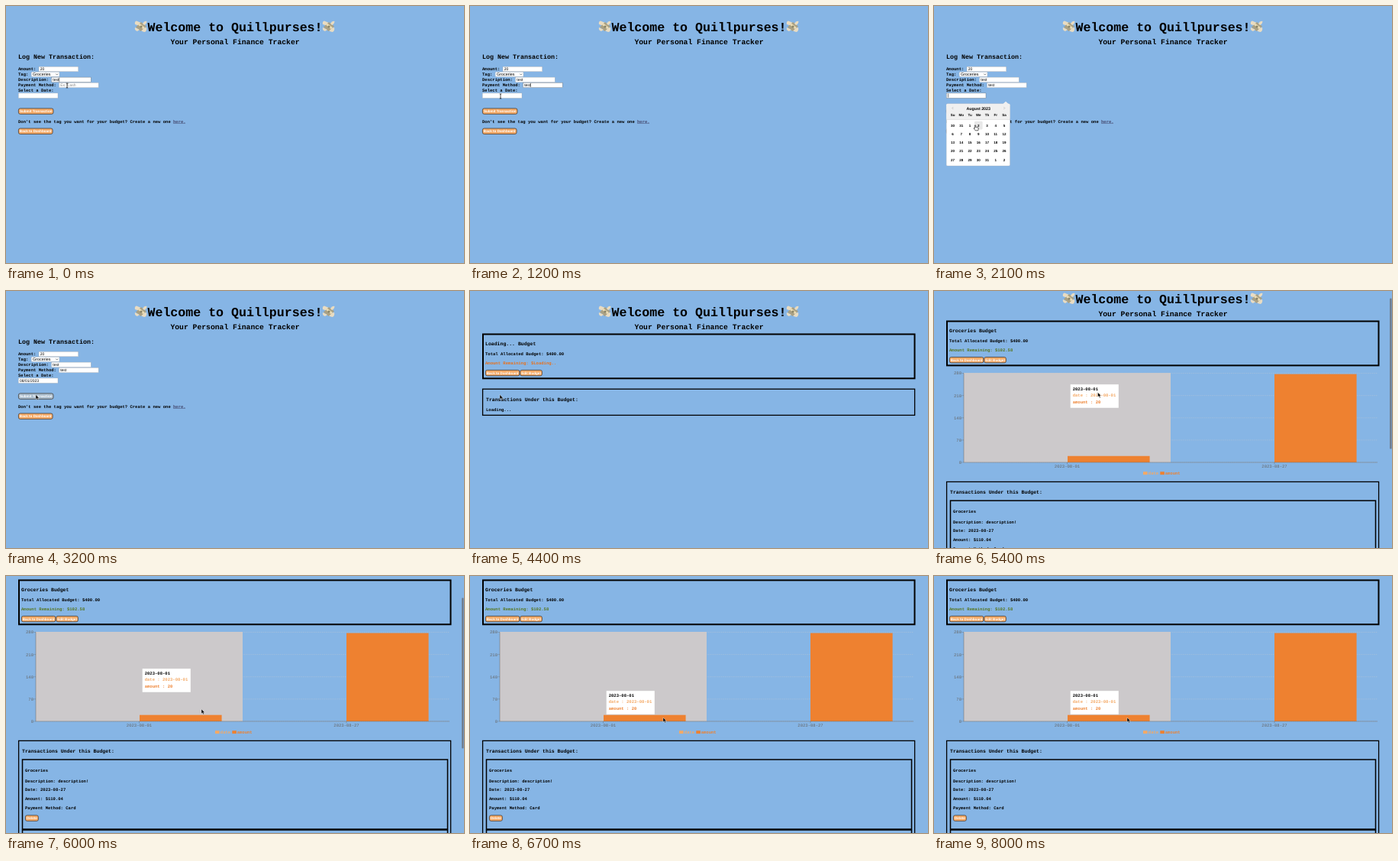
Animation of 600 by 336 pixels, one loop 8100 ms. Source, as an HTML page:

```html
<!DOCTYPE html>
<html lang="en">
<head>
<meta charset="utf-8">
<title>Finance tracker</title>
<style>
  html, body { margin: 0; height: 100%; overflow: hidden; background: #86b5e5; }
  svg { display: block; width: 100vw; height: 100vh; }
  text { font: bold 5.55px "Liberation Mono", monospace; text-rendering: geometricPrecision; }
  .sans { font-family: "Liberation Sans", sans-serif; }
  .plain { font-weight: normal; }
</style>
</head>
<body>
<svg id="stage" viewBox="0 0 600 336"></svg>
<script>
const LOOP = 8100;
const ORANGE = '#ee8130', SAND = '#f4a965', FIELD_EDGE = '#9ba3ac';
const CHART = { left: 39, right: 581, top: 124.5, bottom: 241, max: 280 };
const chartY = v => CHART.bottom - v / CHART.max * (CHART.bottom - CHART.top);

// Markup helpers
const text = (x, y, s, { size = 5.55, fill = '#000', anchor = 'start', cls = '', id = '' } = {}) =>
  `<text id="${id}" x="${x}" y="${y}" class="${cls}" fill="${fill}" text-anchor="${anchor}" style="font-size:${size}px">${s}</text>`;
const rect = (x, y, w, h, fill, more = '') =>
  `<rect x="${x}" y="${y}" width="${w}" height="${h}" fill="${fill}" ${more}/>`;
const frame = (x, y, w, h, width) => rect(x, y, w, h, 'none', `stroke="#000" stroke-width="${width}"`);
const group = (id, ...parts) => `<g id="${id}">${parts.join('')}</g>`;
const input = (x, y, id, value = '') =>
  rect(x, y, 51.8, 6.6, '#fff', `id="${id}Box" stroke="${FIELD_EDGE}" stroke-width=".4"`) +
  text(x + 1.8, y + 5, value, { cls: 'sans plain', id, size: 5 });
const button = (x, y, w, label, id = '') =>
  rect(x + .4, y + .4, w - .8, 7.4, SAND, `id="${id}" rx="2.2" stroke="#3b3028" stroke-width=".7"`) +
  text(x + w / 2, y + 5.8, label, { size: 4.6, fill: '#fff', anchor: 'middle', cls: 'sans' });

const money = x => `<g transform="translate(${x} 19)">
  <path d="M1 5Q0 1 3 .5L9 3 7 7ZM10 11L16 9Q17 13 14 15Q11 15 9 13Z" fill="#e9dcc2"/>
  <path d="M2 8.5L9 2 16 7.5 8.5 14Z" fill="#aaa184"/><path d="M5 5.6L7 3.8 14 9.2 11.8 11.2Z" fill="#ecdcb4"/>
  <circle cx="9" cy="8" r="1.6" fill="#8a8568"/>
  <path d="M11 4Q13 0 16.5 1Q16 5 13 6ZM1 9Q0 13 4 14L7 12Z" fill="#e9dcc2"/></g>`;

const header = group('header',
  money(168), money(414),
  text(300, 33, 'Welcome to Quillpurses!', { size: 16.6, anchor: 'middle' }),
  text(300, 49.5, 'Your Personal Finance Tracker', { size: 9.72, anchor: 'middle' }));

function calendar() {
  const sans = { cls: 'sans', anchor: 'middle', size: 4.5 };
  const col = i => 24.6 + 11.23 * i;
  const names = ['Su', 'Mo', 'Tu', 'We', 'Th', 'Fr', 'Sa'].map((d, i) => text(col(i), 144, d, sans));
  const days = Array.from({ length: 35 }, (_, i) =>
    text(col(i % 7), 157.8 + 11.2 * Math.floor(i / 7), i < 2 ? 30 + i : (i - 2) % 31 + 1, sans));
  return group('calendar',
    rect(16.2, 127.7, 83.3, 81.3, '#fff', 'rx="1.6" stroke="#aeb3ba" stroke-width=".4"'),
    '<path d="M90.5 128L94 124.8 97.5 128Z" fill="#f0f0f0"/>',
    rect(16.4, 127.9, 82.9, 20.3, '#f0f0f0', 'rx="1.4"'),
    rect(16.4, 148, 82.9, .4, '#c4c4c4'),
    '<path d="M25.3 132L23.8 133.5 25.3 135M91.3 132L92.8 133.5 91.3 135" fill="none" stroke="#bbb" stroke-width=".8"/>',
    text(58.2, 136, 'August 2023', { ...sans, size: 5.3 }),
    rect(0, 150.8, 10.6, 10.6, '#e8e8e8', 'id="hoverDay" rx="1.4"'),
    ...names, ...days);
}

const form = group('form',
  text(16, 69, 'Log New Transaction:', { size: 8.33 }),
  text(16, 84.3, 'Amount:'), input(43, 79.2, 'amount', '20'),
  text(16, 91.2, 'Tag:'),
  rect(33.2, 86.2, 36.8, 6.2, '#fff', `rx="1" stroke="${FIELD_EDGE}" stroke-width=".4"`),
  text(35, 91.1, 'Groceries', { cls: 'sans plain', size: 5.4 }),
  '<path d="M65.3 88.6L66.7 90.1 68.1 88.6" fill="none" stroke="#333" stroke-width=".6"/>',
  text(16, 98, 'Description:'), input(59.5, 93.1, 'description', 'test'),
  text(16, 105.1, 'Payment Method:'), input(69.4, 100.2, 'payment'),
  text(16, 112, 'Select a Date:'), input(16.2, 113.9, 'date'),
  rect(0, 0, .5, 5, '#000', 'id="caret"'),
  button(16, 133.5, 46.4, 'Submit Transaction', 'submit'),
  text(16, 152.6, "Don't see the tag you want for your budget? Create a new one"),
  text(219, 152.6, 'here.', { fill: '#454a70' }),
  rect(219, 153.3, 16, .5, '#454a70'),
  button(16, 159.6, 45.5, 'Back to Dashboard'),
  calendar());

const summary = group('summary',
  frame(17, 56.5, 565.5, 57.8, 2),
  text(20, 71, '', { size: 6.5, id: 'heading' }),
  text(20, 84, 'Total Allocated Budget: $400.00'),
  text(20, 95.8, '', { id: 'remaining' }),
  button(20, 103, 45.3, 'Back to Dashboard'),
  button(65.3, 103, 29.5, 'Edit Budget'));

const waiting = group('waiting',
  frame(16.6, 128.2, 566, 34.2, 1.3),
  text(21, 144, 'Transactions Under this Budget:', { size: 6.5 }),
  text(21, 157, 'Loading...'));

const { left, right, top: plotTop, bottom } = CHART;
const ticks = [0, 70, 140, 210, 280].map(v =>
  `<path d="M${left} ${chartY(v)}H${right}" stroke="#ccc" stroke-width=".4" stroke-dasharray="1.25 1.25"/>` +
  `<path d="M${left - 2.5} ${chartY(v)}H${left}" stroke="#666" stroke-width=".4"/>` +
  text(36, chartY(v) + 1.9, v, { fill: '#666', anchor: 'end', cls: 'plain' }));
const dates = [[174.5, '2023-08-01'], [446, '2023-08-27']].map(([x, s]) =>
  `<path d="M${x} ${bottom}v2.5" stroke="#666" stroke-width=".4"/>` +
  text(x, 248, s, { fill: '#666', anchor: 'middle', cls: 'plain' }));

const details = group('details',
  ...ticks,
  rect(left, plotTop - .5, 271, bottom - plotTop + .5, '#ccc9cb', 'id="band"'),
  rect(175, 0, 107.6, 0, ORANGE, 'id="bar0"'),
  rect(446, 0, 107.6, 0, ORANGE, 'id="bar1"'),
  `<path d="M${left} ${plotTop}V${bottom}H${right}" fill="none" stroke="#666" stroke-width=".5"/>`,
  ...dates,
  rect(274, 253.2, 5.6, 3.9, SAND), text(280.8, 256.7, 'date', { fill: SAND }),
  rect(296.3, 253.2, 5.6, 3.9, ORANGE), text(302.7, 256.7, 'amount', { fill: ORANGE }),
  frame(16.6, 266.4, 566, 400, 1.3),
  text(21, 282.4, 'Transactions Under this Budget:', { size: 6.5 }),
  frame(21.5, 291, 557, 91, 1.5), frame(21.5, 383, 557, 91, 1.5),
  ...[[307, 'Groceries'], [320.6, 'Description: description!'], [332.2, 'Date: 2023-08-27'],
    [344.2, 'Amount: $110.04'], [356, 'Payment Method: Card']].map(([y, s]) => text(25, y, s)),
  button(25, 363.5, 17.8, 'Delete'),
  group('tooltip',
    rect(178.5, 0, 63.5, 31, '#fff', 'stroke="#ccc" stroke-width=".4"'),
    text(181.7, 8.2, '2023-08-01'),
    text(181.7, 16.4, 'date : 2023-08-01', { fill: SAND }),
    text(181.7, 25.2, 'amount : 20', { fill: ORANGE })));

const pointers = group('pointer',
  '<path id="arrow" d="M0 0V6L1.4 4.8 2.5 7.1 3.5 6.6 2.5 4.4H4.3Z" fill="#000" stroke="#fff" stroke-width=".4"/>',
  '<path id="beam" d="M-1.2 -3.2Q0 -3.2 0 -2.4Q0 -3.2 1.2 -3.2M0 -2.6V2.6M-1.2 3.2Q0 3.2 0 2.4Q0 3.2 1.2 3.2" fill="none" stroke="#000" stroke-width=".7"/>',
  '<path id="hand" d="M-.7 0Q0 -.8 .7 0V2.5Q1.5 2 2 2.8Q3 2.3 3.3 3.2Q4.3 3 4.3 4L3.8 6.8H.2L-2 4Q-1.8 3-.7 4Z" fill="#fff" stroke="#000" stroke-width=".6"/>');

const stage = document.getElementById('stage');
stage.innerHTML = group('page', header, form, group('budget', summary, waiting, details)) +
  rect(597, 0, 2.6, 197, '#6f7f92', 'id="scrollbar" rx="1.3"') + pointers;

// Animation
const $ = id => document.getElementById(id);
const show = (id, on) => $(id).style.display = on ? '' : 'none';
const set = (id, attrs) => Object.entries(attrs).forEach(([k, v]) => $(id).setAttribute(k, v));
const move = (id, x, y) => set(id, { transform: `translate(${x} ${y})` });
const progress = (t, a, b) => Math.min(1, Math.max(0, (t - a) / (b - a)));
const smooth = p => p * p * (3 - 2 * p);

// Eased value(s) from a list of [time, ...values]
function at(keys, t) {
  const i = keys.findIndex(k => k[0] > t);
  if (i < 0) return keys.at(-1).slice(1);
  if (i === 0) return keys[0].slice(1);
  const [a, b] = [keys[i - 1], keys[i]];
  const p = smooth(progress(t, a[0], b[0]));
  return a.slice(1).map((v, j) => v + (b[j + 1] - v) * p);
}

const POINTER = [[0, 80, 104], [850, 80, 104], [1150, 40, 118], [1400, 40, 118], [1950, 54, 156],
  [2150, 54, 156], [2400, 46, 156], [2700, 46, 156], [3100, 39, 135.5], [4450, 39, 135.5],
  [5080, 208, 126], [5250, 208, 126], [5900, 256, 174], [6050, 256, 174], [6500, 253, 185]];
const TOOLTIP = [[5100, 130], [5750, 150], [6000, 172], [6500, 201]];
const SCROLL = [[5150, 0], [5800, 51]];
const OPEN = 1300, PICK = 2500, BUDGET = 4300, LOADED = 4600;

function drawForm(t) {
  const typed = 'test'.slice(0, Math.max(0, Math.floor((t - 300) / 100)));
  const focus = t < 200 ? 'description' : t < OPEN ? 'payment' : t < PICK ? 'date' : '';
  $('payment').textContent = typed || 'Ex: Cash';
  set('payment', { fill: typed ? '#000' : '#858585' });
  $('date').textContent = t < PICK ? '' : '08/01/2023';
  for (const id of ['description', 'payment', 'date'])
    set(id + 'Box', { stroke: id === focus ? '#5c6671' : FIELD_EDGE });
  show('caret', focus);
  if (focus) {
    const field = $(focus);
    const width = focus === 'payment' && !typed ? 0 : field.getComputedTextLength();
    set('caret', { x: +field.getAttribute('x') + width + .2, y: field.getAttribute('y') - 4.3 });
  }
  show('calendar', t >= OPEN && t < PICK);
  show('hoverDay', t >= 1850);
  set('hoverDay', { x: t < 2300 ? 53 : 41.8 });
  set('submit', { fill: t < 2950 ? SAND : '#a9bccd' });
}

function drawBudget(t) {
  const loaded = t >= LOADED;
  $('heading').textContent = (loaded ? 'Groceries' : 'Loading...') + ' Budget';
  $('remaining').textContent = 'Amount Remaining: $' + (loaded ? '102.58' : 'Loading..');
  set('remaining', { fill: loaded ? '#56761f' : '#e8711c' });
  show('waiting', !loaded);
  show('details', loaded);
  const grow = smooth(progress(t, LOADED, LOADED + 400));
  [20, 277.42].forEach((v, i) => {
    const y = chartY(v * grow);
    set('bar' + i, { y, height: bottom - y });
  });
  show('band', t >= 4700);
  show('tooltip', t >= 4700);
  move('tooltip', 0, at(TOOLTIP, t)[0]);
}

function draw(t) {
  const onForm = t < BUDGET;
  show('form', onForm);
  show('budget', !onForm);
  onForm ? drawForm(t) : drawBudget(t);

  const [scroll] = at(SCROLL, t);
  move('page', 0, -scroll);
  set('scrollbar', { y: scroll * .56, opacity: progress(t, 5150, 5250) * (1 - progress(t, 6300, 6600)) });

  move('pointer', ...at(POINTER, t));
  const kind = t < 900 || (t > 1100 && t < 1500) ? 'beam' : t > 1750 && t < PICK ? 'hand' : 'arrow';
  for (const id of ['arrow', 'beam', 'hand']) show(id, id === kind);
}

const start = performance.now();
(function tick() {
  draw((performance.now() - start) % LOOP);
  requestAnimationFrame(tick);
})();
</script>
</body>
</html>
```
